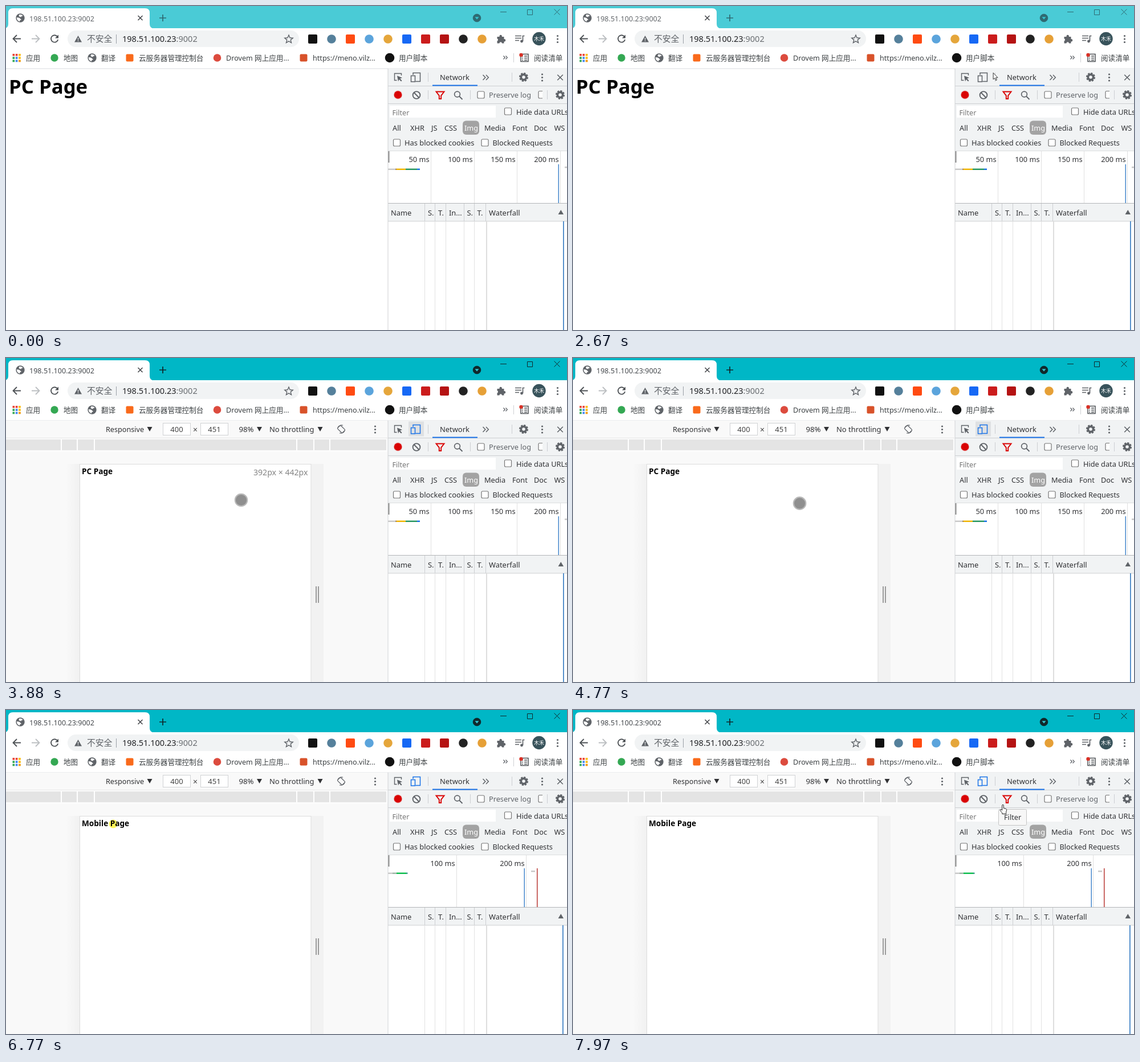
Animation of 984x569 px, one loop 8000 ms. Source, as an HTML page:

```html
<!DOCTYPE html>
<html lang="zh">
<head>
<meta charset="utf-8">
<title>Device toolbar demo</title>
<style>
  html, body { margin: 0; width: 100%; height: 100%; overflow: hidden; background: #fff; }
  svg { display: block; width: 100vw; height: 100vh; }
  text { font-family: 'Noto Sans', 'Noto Sans CJK SC', 'Noto Sans CJK', sans-serif; white-space: pre; }
</style>
</head>
<body>
<svg id="stage" viewBox="0 0 984 569" xmlns="http://www.w3.org/2000/svg"></svg>
<script>
const LOOP = 8000, TICK = 67;
const GREY = '#5f6368', PANEL = '#f1f3f4', LINE = '#cdcfd2', BLUE = '#1a73e8';
const HOST = '198.51.100.23', PORT = ':9002';

// Markup helpers
const text = (x, y, s, size = 12.75, fill = '#303134', more = '') =>
  `<text x="${x}" y="${y}" font-size="${size}" fill="${fill}" ${more}>${s}</text>`;
const rect = (x, y, w, h, fill, more = '') =>
  `<rect x="${x}" y="${y}" width="${w}" height="${h}" fill="${fill}" ${more}/>`;
const disc = (x, y, r, fill, more = '') =>
  `<circle cx="${x}" cy="${y}" r="${r}" fill="${fill}" ${more}/>`;
const path = (d, stroke = GREY, w = 1.6, fill = 'none', more = '') =>
  `<path d="${d}" stroke="${stroke}" stroke-width="${w}" fill="${fill}" ${more}/>`;
const group = (id, body, more = '') => `<g id="${id}" ${more}>${body}</g>`;
const vline = (x, y1, y2, color = LINE, w = 1, more = '') => rect(x, y1, w, y2 - y1, color, more);
const cross = (x, y, r, color, w) => path(`M${x - r} ${y - r}l${2 * r} ${2 * r}m0 ${-2 * r}l${-2 * r} ${2 * r}`, color, w);
const square = (x, y, s, fill) => rect(x - s / 2, y - s / 2, s, s, fill, 'rx="2"');
const box = (x, y) => rect(x - 6, y - 6, 12, 12, '#fff', 'rx="2" stroke="#767676" stroke-width="1.2"');
const kebab = (x, y, gap, r = 1.6) => [-gap, 0, gap].map(d => disc(x, y + d, r, GREY)).join('');
const down = (x, y) => path(`M${x - 4.5} ${y - 4}h9l-4.5 8z`, 'none', 0, '#303134');
const end = 'text-anchor="end"', mid = 'text-anchor="middle"';

const gear = (x, y) =>
  disc(x, y, 4.6, 'none', `stroke="${GREY}" stroke-width="3.6"`) +
  disc(x, y, 6.8, 'none', `stroke="${GREY}" stroke-width="2.4" stroke-dasharray="3.3 2.04"`);
const globe = (x, y) => disc(x, y, 7.7, GREY) +
  `<g transform="translate(${x} ${y})">` +
  path('M-6.2 -1L-2.5 -.4Q-.5 0 0 1.6Q2.2 1.6 1.6 3.2L-.4 4L-1 6.2Q-6.2 5 -6.2 -1ZM-1.6 -5.9Q2.4 -6.6 5 -3.6L2.4 -3.2L1.6 -1.4L-1 -2L-2.6 -3.4Z', 'none', 0, '#fff') + '</g>';

function titleBar() {
  return rect(0, 0, 984, 39, '#00b7c6', 'id="bar"') +
    path('M-4 39.5Q4 39.5 4 31V12Q4 4 12 4H244Q252 4 252 12V31Q252 39.5 260 39.5Z', 'none', 0, '#fff') +
    group('favicon', globe(25, 21)) +
    group('spinner', path('M25 14A7 7 0 1 1 18 21', GREY, 2)) +
    text(41, 26.5, HOST + PORT, 12.55, GREY, 'id="title"') +
    cross(235.5, 21, 4, '#3f4246', 1.5) +
    group('wintop',
      '<path d="M269 21h12m-6 -6v12" stroke-width="1.7"/>' +
      '<path d="M867 10.5h11M914.5 6.5h9v9h-9zM961.5 5.5l10 10m0 -10l-10 10" fill="none"/>' +
      '<circle cx="826" cy="21" r="6.8" fill="currentColor"/>') +
    path('M822.5 19.2h7l-3.5 4.3z', 'none', 0, '#35c6d2');
}

function toolbar() {
  const exts = [
    ['s', '#111'], ['c', '#55809b'], ['s', '#ff4b12'], ['c', '#5ba4dc'], ['c', '#e5a63b'], ['s', '#1668f5'],
    ['s', '#cb1c1c'], ['s', '#b51313'], ['c', '#222'], ['c', '#e6a037']
  ].map(([kind, color], i) => {
    const x = 538 + 33 * i;
    return kind === 's' ? square(x, 58, 16, color) : disc(x, 58, 7.8, color, i === 3 ? 'id="ext"' : '');
  }).join('');
  return rect(0, 39, 984, 71, '#fff') +
    path('M26 57.5H13M19 51l-6.5 6.5L19 64', '#4d5155', 1.8) +
    path('M45 57.5H58M52 51l6.5 6.5L52 64', '#bcbfc2', 1.8) +
    group('reload', path('M90 53.5A6.2 6.2 0 1 0 91.2 59', '#4d5155', 1.8) + path('M92 50.5v6h-6z', 'none', 0, '#4d5155')) +
    group('stop', cross(85, 57.5, 5, '#4d5155', 1.8)) +
    rect(108, 43, 406, 29, PANEL, 'rx="14.5"') +
    path('M126.5 52L133 63.5H120Z', 'none', 0, GREY) + path('M126.5 56v3.5m0 1v1.5', PANEL, 1.3) +
    text(142, 63, '不安全', 14.8, GREY) + vline(193, 50, 66, '#9aa0a6') +
    text(204, 63, `${HOST}<tspan fill="#6a6e72">${PORT}</tspan>`, 14.5, '#202124') +
    path('M496 51l2 4.8 5.2 .4 -4 3.4 1.3 5 -4.5 -2.7 -4.5 2.7 1.3 -5 -4 -3.4 5.2 -.4z', GREY, 1.4) +
    exts +
    path('M861.5 54h4v-1a2.2 2.2 0 0 1 4.4 0v1h3.6v4h.6a2.2 2.2 0 0 1 0 4.4h-.6v3.1h-3.6a2 2 0 0 0 -4.4 0h-4v-4a2.2 2.2 0 0 0 0 -4.2z', 'none', 0, GREY) +
    path('M893 52.5h11M893 56.5h11M893 60.5h7M906.5 62V52.5h3', GREY, 1.7) + disc(904.5, 62, 2.4, GREY) +
    disc(935, 57.5, 11.7, '#38535b') + text(935, 61, '木禾', 9, '#fff', mid) +
    kebab(967.5, 58, 5.5);
}

function bookmarks() {
  const dots = ['#ea4335', '#ea4335', '#fbbc04', '#34a853', '#4285f4', '#fbbc04', '#34a853', '#4285f4', '#f29900'];
  return dots.map((c, i) => rect(11.5 + 5.3 * (i % 3), 84 + 5.3 * Math.floor(i / 3), 3.7, 3.7, c)).join('') +
    disc(85, 91, 6.7, '#34a853') + globe(151, 91) + square(217, 91, 13, '#f96a1b') +
    disc(370.5, 91, 6.8, '#dc4b3e') + square(522, 91, 13, '#d8522a') + disc(673, 91, 8.3, '#111') +
    [[35, '应用'], [101, '地图'], [167, '翻译'], [233, '云服务器管理控制台'], [386, 'Drovem 网上应用...'],
      [538, 'https://meno.vilz...'], [689, '用户脚本'], [926, '阅读清单']]
      .map(([x, s]) => text(x, 96, s, 12.6, '#3c4043')).join('') +
    path('M872.5 87.5l2.8 3 -2.8 3m4 -6l2.8 3 -2.8 3', GREY, 1.3) +
    vline(890, 83, 99, '#cfd1d4') +
    path('M903 84.5h13v13h-13z', '#4d5155', 1.5) + path('M905 88h2m2 0h5m-9 3.5h2m2 0h5m-9 3.5h2m2 0h5', '#4d5155', 1.3) +
    disc(903.5, 86, 3.2, '#d93025') +
    rect(0, 109.5, 984, 1, '#dadce0');
}

function deviceView() {
  return rect(0, 110, 669, 459, '#f9f9f9') +
    rect(0, 141, 669, 24, '#fff', 'opacity=".6"') + rect(0, 143, 667, 19, '#e4e4e4') +
    [96, 124, 154, 509, 539, 567].map(x => vline(x, 143, 162, '#fff', 2)).join('') +
    rect(0, 140, 669, 1, '#e6e6e6') +
    text(175, 130, 'Responsive', 12.65) + down(252, 125) +
    [[275, '400'], [341, '451']].map(([x, s]) =>
      rect(x + .5, 114.5, 48, 21, '#fff', 'stroke="#d0d2d4"') + text(x + 24.5, 130, s, 13, '#444', mid)).join('') +
    text(332, 131, '×', 14, '#444', mid) +
    text(408.5, 130, '98%', 13.2) + down(444.5, 125) + text(462, 130, 'No throttling', 12.95) + down(551, 125) +
    `<g transform="rotate(-45 588 125)">${rect(584, 119, 8, 12, 'none', `rx="1.5" stroke="${GREY}" stroke-width="1.3"`)}</g>` +
    path('M582 122A7.5 7.5 0 0 1 591 118.2M594 128A7.5 7.5 0 0 1 585 131.8', GREY, 1.2) +
    kebab(647.5, 125.5, 5.5) +
    rect(105, 186, 24, 383, 'url(#fade)') +
    rect(535, 186, 22, 383, '#f2f2f2') + vline(543, 401, 430, '#9c9c9c', 2) + vline(547, 401, 430, '#9c9c9c', 2) +
    rect(129.5, 186.5, 405.5, 400, '#fff', 'stroke="#dcdcdc"') +
    text(133, 204, '', 13.6, '#000', 'id="heading" font-weight="700"') +
    text(434, 206, '392px × 442px', 14.1, '#858585', 'id="size"');
}

const timeline = (marks, bars, lines) =>
  marks.map(([x, s]) => vline(x, 255, 346, '#e0e0e0') + text(x - 2.5, 273.5, s, 12.75, '#303134', end)).join('') +
  bars.map(([x, w, c, y = 285.5, h = 2.5]) => rect(x, y, w, h, c)).join('') +
  lines.map(([x, c]) => vline(x, 278, 346, c, 1.5)).join('');

function devTools() {
  const labels = [[678, 'All'], [709, 'XHR'], [746, 'JS'], [769, 'CSS'], [804, 'Img'], [839, 'Media'], [888, 'Font'], [926, 'Doc'], [961.5, 'WS']];
  const heads = [[675, 'Name'], [740, 'S.'], [758, 'T.'], [777, 'In...'], [808.5, 'S.'], [826.5, 'T.'], [847, 'Waterfall']];
  const columns = [734, 752, 771, 803, 821];
  return rect(670, 110, 314, 145, PANEL) + rect(670, 255, 314, 314, '#fff') +
    [140, 171].map(y => rect(670, y, 314, 1, LINE)).join('') + rect(670, 254, 314, 1, '#dcdee0') +
    rect(706, 111.5, 27, 26, '#dfe1e3', 'id="hover"') +
    path('M693.5 122v-3.5h-12v12h4', GREY, 1.4) + path('M686 122.5l9 3.6 -3.8 1.5 3.3 3.4 -1.5 1.4 -3.3 -3.4 -1.7 3.5z', 'none', 0, GREY) +
    group('device', '<path d="M714 121v-3.5h12.5v15h-8M710.5 122.5h7v10.5h-7z" fill="none" stroke-width="1.5"/>') +
    vline(740, 117, 133) + text(761, 130, 'Network', 12.9) + rect(748, 138.5, 79, 2, BLUE) +
    path('M836.5 121l4.3 4.5 -4.3 4.5m5.5 -9l4.3 4.5 -4.3 4.5', GREY, 1.5) +
    vline(887, 117, 133) + gear(908, 125) + kebab(940.5, 125.5, 5.5) + cross(972, 125.5, 4.8, GREY, 1.6) +
    disc(687.5, 156, 7.8, '#ecc4c4') + disc(687.5, 156, 6.8, '#d90303') +
    disc(720, 156.5, 6.4, 'none', `stroke="${GREY}" stroke-width="1.9"`) + path('M715.5 152l9 9', GREY, 1.9) +
    vline(740, 148, 164) +
    path('M754.5 150.5h14l-5.3 6.8v5.7h-3.4v-5.7z', '#d90303', 1.9) +
    disc(791.5, 155, 4.9, 'none', `stroke="${GREY}" stroke-width="1.7"`) + path('M795 158.5l5.5 5.5', GREY, 1.8) +
    vline(814, 148, 164) + box(833, 156) + text(847, 161, 'Preserve log', 12.7, GREY) +
    path('M941 149.5h-5q-2 0 -2 2v8.5q0 2 2 2h5', '#767676', 1.2, '#fff') +
    vline(949, 148, 164) + gear(972, 156) +
    rect(673, 175, 186, 21, '#fff') + text(677.5, 191.5, 'Filter', 12.6, '#757575') +
    box(880.5, 185) + text(895, 190.5, 'Hide data URLs') +
    rect(801, 201.5, 29, 24.5, '#a3a3a3', 'rx="6"') +
    labels.map(([x, s]) => text(x, 219, s, 12.75, s === 'Img' ? '#fff' : '#303134')).join('') +
    box(685.5, 240) + text(699, 245, 'Has blocked cookies', 12.9) + box(840, 240) + text(853.5, 245, 'Blocked Requests') +
    rect(670, 255, 2.5, 20, '#8b8b8b') +
    group('netpc', timeline(
      [[745, '50 ms'], [821, '100 ms'], [896, '150 ms'], [972, '200 ms']],
      [[670, 13, '#c8c8c8'], [683, 2, '#b08a5a'], [685, 16, '#f0b400'], [701, 20, '#27965f'], [721, 5, BLUE], [980, 4, '#c8c8c8', 282]],
      [[968.5, '#4688cc']])) +
    group('netmob', timeline(
      [[790, '100 ms'], [912, '200 ms']],
      [[670, 8, '#c8c8c8'], [678, 7, '#9fb5a6'], [685, 17, '#0dbd4d'], [702, 2.5, '#3a9a8c'], [921, 7, '#c8c8c8', 282]],
      [[908.5, '#4688cc'], [931, '#b93a36']])) +
    rect(670, 346, 314, 1, '#b4b6b8') + rect(670, 347, 314, 31, PANEL) + rect(670, 377.5, 314, 1, LINE) +
    columns.map(x => vline(x, 347, 378) + vline(x, 378, 569, '#e2e2e2')).join('') +
    vline(841, 347, 378) + vline(842, 378, 569, '#dedede', 2) +
    heads.map(([x, s]) => text(x, 367.5, s, 12.9)).join('') +
    path('M968.5 366h9.5l-4.75 -8z', 'none', 0, GREY) +
    vline(977, 378, 569, '#3b7fc4', 1.7, 'id="now"') +
    vline(669.5, 110, 569, '#cfd1d4');
}

function overlays() {
  return group('tip', rect(746.5, 174.5, 49, 28, '#f7f7f7', 'rx="2" stroke="#c4c4c4"') + text(756, 193, 'Filter', 12.75)) +
    disc(0, 0, 7.5, '#fff200', 'id="glow" style="mix-blend-mode:multiply" opacity=".65"') +
    group('arrow', path('M0 0V11.5L2.6 9.2L4.5 13.4L6.3 12.6L4.5 8.5H8Z', '#333', 1, '#fff')) +
    group('hand', path('M-1.3 9V.8Q-1.3 -.7 0 -.7Q1.3 -.7 1.3 .8V5.5L5.5 6.5Q6.8 7 6.6 8.5L5.6 12.5V15.5H-1.2V13.5L-4.8 9.5Q-5.2 7.6 -3.3 7.8Z', '#222', 1, '#fff')) +
    disc(0, 0, 10.7, '#8f8f8f', 'id="touch" stroke="#b9b9b9" stroke-width="2.2"');
}

const svg = document.getElementById('stage');
svg.innerHTML =
  '<defs><linearGradient id="fade"><stop stop-color="#f9f9f9"/><stop offset="1" stop-color="#f1f1f1"/></linearGradient></defs>' +
  rect(0, 0, 984, 569, '#fff') + titleBar() + toolbar() + bookmarks() +
  group('plain', text(5, 154, 'PC Page', 34.7, '#000', 'font-weight="600"')) +
  group('mobile', deviceView()) + devTools() + overlays();

const el = {};
svg.querySelectorAll('[id]').forEach(n => el[n.id] = n);
const show = (id, on) => el[id].setAttribute('display', on ? 'inline' : 'none');
const set = (id, name, value) => el[id].setAttribute(name, value);

// Pointer route: time, x, y
const route = [
  [335, 917, 560], [400, 905, 450], [530, 870, 260], [640, 835, 160], [730, 809, 130], [804, 809, 130],
  [1200, 622, 142], [1500, 430, 108], [1670, 352, 103], [1742, 329, 113], [2000, 247, 122], [2100, 290, 113],
  [2340, 640, 132], [2430, 906, 130], [2540, 750, 117], [2613, 750, 117], [2800, 714, 118], [2948, 714, 118],
  [3015, 717, 127], [3350, 717, 127], [3500, 640, 150], [3650, 540, 200], [3886, 412.5, 249.5], [4560, 412.5, 249.5],
  [4890, 387.5, 259], [5850, 387.5, 259], [6100, 345, 258], [6400, 260, 232], [6700, 210, 201], [6767, 188, 200],
  [6900, 147, 202], [7000, 160, 202], [7250, 320, 200], [7430, 480, 190], [7500, 560, 145], [7571, 589, 178],
  [7700, 690, 210], [7840, 858, 200], [7973, 754, 167]
];

function pointer(t) {
  const i = route.findIndex(p => p[0] > t);
  if (i < 0) return route[route.length - 1].slice(1);
  if (i === 0) return route[0].slice(1);
  const [t0, x0, y0] = route[i - 1], [t1, x1, y1] = route[i];
  const k = (t - t0) / (t1 - t0);
  return [x0 + (x1 - x0) * k, y0 + (y1 - y0) * k];
}

function draw(ms) {
  const t = Math.floor((ms + 10) / TICK) * TICK;
  const within = (a, b) => t >= a && t < b;
  const active = t >= 3210, open = t >= 3400, reloaded = t >= 5500, loading = within(5390, 5600);

  set('bar', 'fill', active ? '#00b7c6' : '#4acbd6');
  const ink = active ? '#10282b' : '#2f6a72';
  set('wintop', 'stroke', ink);
  set('wintop', 'color', ink);
  set('title', 'fill', active ? '#45494d' : '#63676b');
  set('ext', 'fill', within(5390, 6000) ? '#a0a0a0' : '#5ba4dc');

  show('favicon', !loading);
  show('spinner', loading);
  set('spinner', 'transform', `rotate(${t * .5 % 360} 25 21)`);
  show('reload', !loading);
  show('stop', loading);

  show('plain', !open);
  show('mobile', open);
  el.heading.textContent = reloaded ? 'Mobile Page' : 'PC Page';
  set('size', 'opacity', Math.max(0, Math.min(1, (4490 - t) / 260)));
  show('hover', within(3210, 5950));
  set('device', 'stroke', open ? BLUE : GREY);
  show('netpc', t < 5390);
  show('netmob', reloaded);
  set('now', 'x', reloaded ? 976 : 977);

  const [x, y] = pointer(t);
  const tapping = within(6760, 6830), pressing = within(3210, 3340);
  const touch = open && x > 129 && x < 535 && y > 186;
  const hand = within(3010, 3400) || t >= 7960;
  const at = `translate(${x} ${y})`;
  ['arrow', 'hand', 'touch', 'glow'].forEach(id => set(id, 'transform', at));
  show('touch', touch && !tapping);
  show('hand', hand);
  show('arrow', t >= 330 && !touch && !hand);
  show('glow', tapping || pressing);
  show('tip', t >= 7960);
}

function loop(now) {
  draw(now % LOOP);
  requestAnimationFrame(loop);
}
draw(0);
requestAnimationFrame(loop);
</script>
</body>
</html>
```
